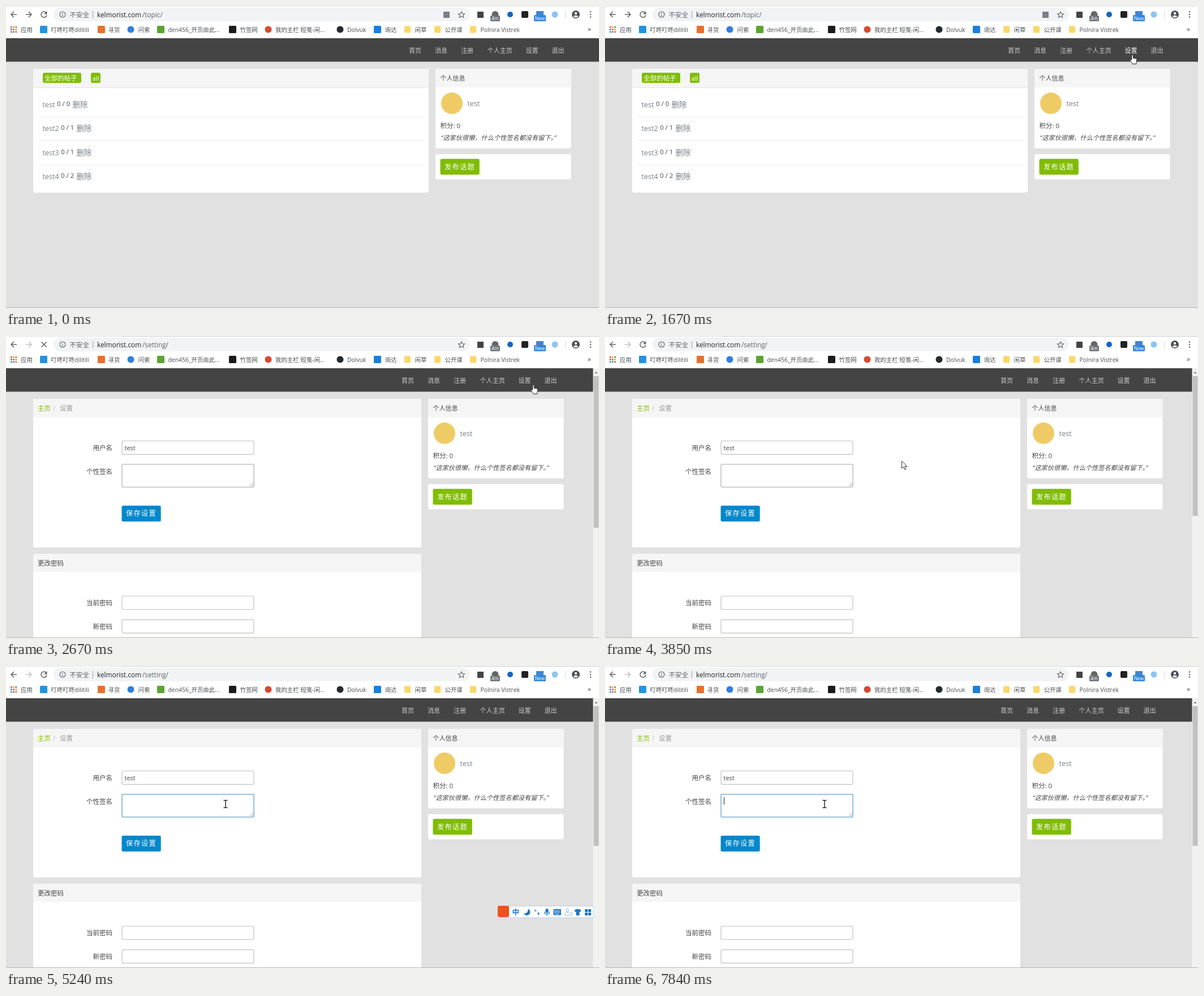
Animation, 1048 px wide and 534 px high, one loop 8000 ms. Source, as an HTML page:

```html
<!DOCTYPE html>
<html lang="zh-CN">
<head>
<meta charset="utf-8">
<title>Settings page walkthrough</title>
<style>
  html, body { margin: 0; width: 100%; height: 100%; overflow: hidden; background: #e1e1e1; }
  svg { display: block; width: 1048px; height: 534px; }
  text { font: 11.5px "Open Sans", "Noto Sans CJK SC", sans-serif; fill: #444; white-space: pre; }
  .bookmark { font-size: 10.4px; fill: #4a4d51; }
  .url { font-size: 11.8px; fill: #202124; }
  .soft { fill: #5f6368; }
  .nav text { font-size: 11.1px; fill: #ccc; }
  .nav .hover { fill: #fff; }
  .link { font-size: 12.6px; fill: #778087; }
  .delete { font-size: 13.4px; fill: #778087; }
  .button { font-size: 12.2px; letter-spacing: 1.3px; fill: #fff; }
  .label { text-anchor: end; }
  .badge { font-size: 8.5px; fill: #fff; text-anchor: middle; }
  .card { fill: #fff; }
  .head { fill: #f5f5f5; }
  .green { fill: #80bd01; }
  .white { fill: #fff; }
  .field { fill: #fff; stroke: #c2c2c2; stroke-width: 1.2; }
  .icon { fill: none; stroke: #5f6368; stroke-width: 1.5; }
  .ime { fill: #1b74c5; }
</style>
</head>
<body>
<svg viewBox="0 0 1048 534">
  <rect width="1048" height="534" fill="#e1e1e1"/>

  <!-- Browser toolbar -->
  <rect width="1048" height="57" fill="#fff"/>
  <rect width="1048" height="1" fill="#dee1e6"/>
  <rect id="tabLine" x="205" width="843" height="1" fill="#c9ccd0"/>
  <path class="icon" d="M19 15H9m5-5-5 5 5 5"/>
  <path id="forward" class="icon" d="M35 15h10m-5-5 5 5-5 5"/>
  <g id="reload"><path class="icon" d="M71 12A5 5 0 1 0 72 16"/><path class="soft" d="M72.5 9v5.5H67z"/></g>
  <path id="stop" class="icon" d="m62.5 10.5 9 9m0-9-9 9"/>
  <rect x="84" y="3" width="736" height="24" rx="12" fill="#f1f3f4"/>
  <circle class="icon" cx="100" cy="15" r="5" style="stroke-width:1.2"/>
  <path class="icon" d="M100 12v1.4m0 1v3.6" style="stroke-width:1.2"/>
  <text class="soft" x="112.5" y="19.5">不安全</text>
  <rect x="153" y="9" width="1" height="13" fill="#9aa0a6"/>
  <text class="url" x="161" y="19.5">kelmorist.com</text>
  <text id="path" class="url soft" x="241" y="19.5"></text>
  <rect id="translate" x="773" y="10" width="11" height="11" fill="#7b7f84"/>
  <path class="icon" d="m805 10 1.6 3.5 3.9.4-2.9 2.6.9 3.8-3.5-2-3.5 2 .9-3.8-2.9-2.6 3.9-.4z" style="stroke-width:1.1"/>
  <rect x="833" y="10" width="11" height="11" fill="#444"/>
  <circle cx="864.5" cy="15" r="6" fill="#666"/>
  <rect x="856" y="17" width="17" height="10" rx="1.5" fill="#70757a"/>
  <text class="badge" x="864.5" y="25.3">4m</text>
  <circle cx="891" cy="15" r="5" fill="#1565c0"/>
  <rect x="911" y="9" width="12" height="12" rx="2" fill="#222"/>
  <rect x="937" y="9" width="13" height="10" fill="#4285d0"/>
  <rect x="933" y="16" width="21" height="11" rx="1.5" fill="#2f86dc"/>
  <text class="badge" x="943.5" y="24.8">New</text>
  <circle cx="970" cy="15" r="5.5" fill="#8cc4f0"/>
  <rect x="988" y="9" width="1" height="13" fill="#d5d8dc"/>
  <circle cx="1007" cy="15" r="7" fill="#4b4f55"/>
  <circle cx="1007" cy="13" r="2.2" fill="#fff"/>
  <path class="white" d="M1002.5 18.5q4.5-4 9 0-4.5 4-9 0z"/>
  <g class="soft"><circle cx="1033" cy="10.5" r="1.3"/><circle cx="1033" cy="15" r="1.3"/><circle cx="1033" cy="19.5" r="1.3"/></g>
  <g id="bookmarks"></g>
  <text class="bookmark" x="1028" y="45" style="font-size:12px">»</text>

  <rect y="57" width="1048" height="41.5" fill="#444"/>

  <!-- Topic list -->
  <g id="topics">
    <rect class="card" x="48" y="111" width="699" height="219" rx="3"/>
    <path class="head" d="M48 144v-30q0-3 3-3h693q3 0 3 3v30z"/>
    <rect x="48" y="144" width="699" height="1" fill="#e3e3e3"/>
    <rect class="green" x="65" y="118" width="68" height="18" rx="3"/>
    <text class="white" x="68" y="132">全部的帖子</text>
    <rect class="green" x="150" y="118" width="17" height="18" rx="3"/>
    <text class="white" x="152.5" y="132">all</text>
    <g id="rows"></g>
  </g>

  <!-- Settings form -->
  <g id="settings">
    <rect class="card" x="48" y="111" width="686" height="263" rx="3"/>
    <path class="head" d="M48 144v-30q0-3 3-3h680q3 0 3 3v30z"/>
    <text x="56" y="132" style="fill:#80bd01">主页</text>
    <text x="83" y="132" style="fill:#bbb">/</text>
    <text x="95" y="132" style="fill:#999">设置</text>
    <text class="label" x="188" y="202">用户名</text>
    <rect class="field" x="205" y="185.5" width="233" height="23.8" rx="2.5"/>
    <text x="209.5" y="201.5" style="font-size:11px">test</text>
    <text class="label" x="188" y="243.5">个性签名</text>
    <rect class="field" x="205" y="226.7" width="233.2" height="40.6" rx="2.5" style="stroke-width:1.6"/>
    <rect id="focus" x="205" y="226.7" width="233.2" height="40.6" rx="2.5" fill="none" stroke="#86bce8" stroke-width="1.6"/>
    <path d="m431 265.5 6-6m-2.500 6 2.5-2.5" stroke="#888" stroke-width=".9"/>
    <rect id="caret" x="210" y="232" width="1" height="13" fill="#222"/>
    <rect x="204.5" y="300" width="69.2" height="28" rx="2.5" fill="#08c"/>
    <text class="button" x="212" y="318.3">保存设置</text>

    <path class="card" d="M48 534V388q0-3 3-3h680q3 0 3 3v146z"/>
    <path class="head" d="M48 417v-29q0-3 3-3h680q3 0 3 3v29z"/>
    <text x="56" y="405.5">更改密码</text>
    <text class="label" x="188" y="476">当前密码</text>
    <rect class="field" x="205" y="460" width="233" height="23.5" rx="2.5"/>
    <text class="label" x="188" y="517.8">新密码</text>
    <rect class="field" x="205" y="501.7" width="233" height="23.6" rx="2.5"/>

    <rect x="1037.5" y="57" width="10.5" height="477" fill="#f1f1f1"/>
    <path d="m1040.5 66 2.5-3 2.5 3z" fill="#777"/>
    <rect id="thumb" x="1038.5" y="71" width="9" fill="#c1c1c1"/>
  </g>

  <!-- Navigation links and profile, shared by both pages -->
  <g id="side">
    <g class="nav">
      <text x="712" y="82.5">首页</text>
      <text x="758" y="82.5">消息</text>
      <text x="804" y="82.5">注册</text>
      <text x="850.5" y="82.5">个人主页</text>
      <text id="settingLink" x="918.5" y="82.5">设置</text>
      <text x="964.5" y="82.5">退出</text>
    </g>
    <rect class="card" x="759" y="111" width="239.5" height="140.7" rx="3"/>
    <path class="head" d="M759 144v-30q0-3 3-3h233.5q3 0 3 3v30z"/>
    <text x="767.5" y="132" style="font-size:11px">个人信息</text>
    <circle cx="788" cy="172" r="19" fill="#efcb66"/>
    <text class="link" x="815.5" y="177">test</text>
    <text x="767.5" y="215.5">积分: 0</text>
    <text x="768.5" y="237" style="font-size:11.2px;font-style:italic">“这家伙很懒，什么个性签名都没有留下。”</text>
    <rect class="card" x="759" y="262" width="239.5" height="44.5" rx="3"/>
    <rect class="green" x="767.5" y="270.2" width="69.3" height="28" rx="2.5"/>
    <text class="button" x="775" y="289.3">发布话题</text>
  </g>

  <!-- Input method bar -->
  <g id="imeBar">
    <rect x="880" y="424.5" width="158" height="20.5" fill="#fff" stroke="#b9d3ea"/>
    <rect x="869" y="424" width="20" height="20" rx="3" fill="#f0501e"/>
    <text x="894.5" y="439.5" style="font-size:12.5px;font-weight:700;fill:#1b74c5">中</text>
    <path class="ime" d="M923 429.5a6 6 0 1 1-8 8q7 1 8-8z"/>
    <circle cx="935.5" cy="432.5" r="1.5" fill="none" stroke="#1b74c5"/>
    <path class="ime" d="M939.5 436h3q.5 3-2.5 4.5z"/>
    <rect class="ime" x="953.5" y="429" width="5" height="8" rx="2.5"/>
    <path d="M951.5 434.5q0 4.5 4.5 4.5t4.5-4.5m-4.5 4.5v2.5" fill="none" stroke="#1b74c5" stroke-width="1.2"/>
    <rect class="ime" x="967.5" y="430" width="13.5" height="10.5" rx="1"/>
    <path d="M969 433h10.5m-10.5 2.5h10.5m-9 3h7.5" stroke="#fff" stroke-width="1.3" stroke-dasharray="1.5 1"/>
    <g fill="none" stroke="#9bb4ca"><circle cx="992" cy="432" r="2.5"/><path d="M987.5 440.5q0-5 4.5-5 3 0 4 2m-8.5 3h13v-4h-4"/></g>
    <path class="ime" d="m1004.5 432 4-2.5q2 1.5 4 0l4 2.5-1.5 3-1.5-.5v6.5h-6v-6.5l-1.5.5z"/>
    <path class="ime" d="M1023 430h5v5h-5zm6 0h5v5h-5zm-6 6h5v5h-5zm6 0h5v5h-5z"/>
  </g>

  <rect y="533" width="1048" height="1" fill="#b4b4b4"/>

  <!-- Pointers, each with its hot spot at the origin -->
  <g id="pointer" stroke-linejoin="round">
    <path id="arrow" d="M0 0v13l3-2.7 2.2 5 2.2-1-2.2-4.8h4.3z" fill="#fff" stroke="#333"/>
    <path id="hand" d="M-1.2 9V1.2q1.300-1.800 2.600 0V6l5 1q1.600.5 1.500 2.300l-1 4.700v2.500h-6.500q-1.500-3.500-4.200-5.500-.8-2.200 1.400-2.200z" fill="#fff" stroke="#222"/>
    <path id="beam" d="M-3.5-6.5h2.5l1 1 1-1h2.5M0-5.5v11m-3.5 1h2.5l1-1 1 1h2.5" fill="none" stroke="#222" stroke-width="1.4"/>
  </g>
</svg>
<script>
  const LOOP = 8000;
  const $ = id => document.getElementById(id);
  const show = (id, on) => $(id).setAttribute('visibility', on ? 'inherit' : 'hidden');
  const within = (t, from, to) => t >= from && t < to;

  const square = (x, color) => `<rect x="${x}" y="35" width="13" height="13" rx="1.5" fill="${color}"/>`;
  const disc = (x, color) => `<circle cx="${x + 6.5}" cy="41.5" r="6" fill="${color}"/>`;
  const folder = x => `<rect x="${x}" y="35.5" width="11" height="12" rx="1" fill="#fbd768"/>`;
  const bookmarks = [
    ['', 26, '应用'],
    [square(60, '#2393e0'), 79.5, '叮咚叮咚dilitili'],
    [square(162, '#e9702c'), 180.5, '寻货'],
    [disc(214, '#2f7fe0'), 233.5, '问索'],
    [square(267, '#5aa532'), 286.5, 'den456_开页由此...'],
    [square(394, '#1b1b1b'), 413.5, '竹签网'],
    [disc(457, '#d8482f'), 476, '我的主栏 短笺-闲...'],
    [disc(584, '#24292e'), 603, 'Dolvuk'],
    [square(650, '#1a7fe0'), 669.5, '询达'],
    [folder(704), 722.5, '闲草'],
    [folder(757), 775.5, '公开课'],
    [folder(820), 838.5, 'Polnira Vistrek'],
  ];
  const dotColors = ['#ea5a3c', '#e8a33a', '#4d9d58', '#4a84dc'];
  const dots = Array.from({ length: 9 }, (_, i) =>
    `<rect x="${8 + i % 3 * 4.2}" y="${36 + Math.floor(i / 3) * 4.2}" width="2.8" height="2.8" fill="${dotColors[i % 4]}"/>`);
  $('bookmarks').innerHTML = dots.join('') + bookmarks.map(([icon, x, name]) =>
    `${icon}<text class="bookmark" x="${x}" y="45.5">${name}</text>`).join('');

  const rows = [['test', 0], ['test2', 1], ['test3', 1], ['test4', 2]];
  $('rows').innerHTML = rows.map(([title, views], i) => {
    const y = 179 + i * 42.4;
    const x = i ? 97 : 90;
    const rule = i ? `<rect x="56" y="${Math.round(y - 26.5)}" width="684" height="1" fill="#ededed"/>` : '';
    return `${rule}<text class="link" x="64.5" y="${y}">${title}</text>
      <text x="${x}" y="${y - 2}">0 / ${views}</text>
      <text class="delete" x="${x + 27.5}" y="${y}">删除</text>`;
  }).join('');

  // Pointer legs: start and end time, step count, two points, ease-out power
  const legs = [
    { start: 110, end: 900, steps: 14, from: [980, 545], to: [909, 157], power: 1.37 },
    { start: 960, end: 1670, steps: 12, from: [911, 157], to: [932, 86], power: 1.2 },
    { start: 3080, end: 3850, steps: 14, from: [932, 86], to: [524.5, 221], power: 1.4 },
    { start: 3900, end: 4430, steps: 10, from: [524.5, 221], to: [388, 244], power: 1.4 },
  ];

  function pointerAt(t) {
    const leg = legs.filter(l => t >= l.start).pop();
    if (!leg) return null;
    const done = Math.floor((t - leg.start) / (leg.end - leg.start) * (leg.steps - 1) + 0.001) + 1;
    const p = 1 - (1 - Math.min(1, done / leg.steps)) ** leg.power;
    return leg.from.map((v, i) => v + (leg.to[i] - v) * p);
  }

  function drawPointer(t) {
    const point = pointerAt(t);
    show('pointer', point);
    const [x, y] = point || [0, 0];
    const hand = point && y < 98 && t < 3080;
    const beam = point && t > 3900 && x < 439;
    $('pointer').setAttribute('transform', `translate(${x} ${y})`);
    show('hand', hand);
    show('beam', beam);
    show('arrow', point && !hand && !beam);
    $('settingLink').classList.toggle('hover', Boolean(hand) && t < 2670);
  }

  function draw(t) {
    const loading = within(t, 2020, 2910);
    const navigated = t >= 2370;
    const settings = t >= 2670;
    show('reload', !loading);
    show('stop', loading);
    show('tabLine', t >= 2020);
    show('translate', !navigated);
    $('forward').style.stroke = navigated ? '#c0c3c7' : '';
    $('path').textContent = navigated ? '/setting/' : '/topic/';

    show('topics', !settings);
    show('settings', settings);
    $('side').setAttribute('transform', `translate(${settings ? -13 : 0} 0)`);
    $('thumb').setAttribute('height', t < 2760 ? 268 : 247);

    const focus = Math.floor((t - 4690) / 95 + 1) / 3;
    $('focus').setAttribute('opacity', Math.max(0, Math.min(1, focus)));
    show('caret', settings && (within(t, 4690, 5240) || within(t, 5760, 6280) || within(t, 6780, 7350) || t >= 7840));
    show('imeBar', within(t, 4780, 6950));
    drawPointer(t);
  }

  function frame() {
    draw(performance.now() % LOOP);
    requestAnimationFrame(frame);
  }
  frame();
</script>
</body>
</html>
```
